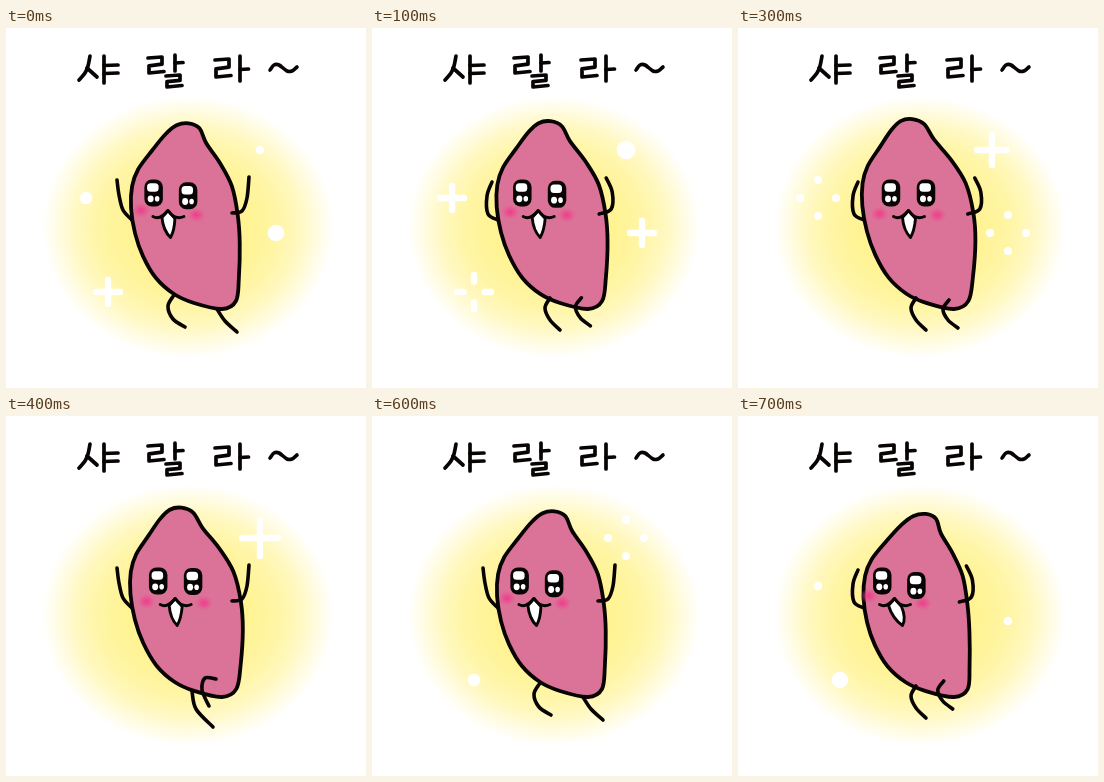
Animation, 360 px wide and 360 px high, one loop 0.8 s. Source, as an HTML page with a canvas:

```html
<!DOCTYPE html>
<html lang="ko">
<head>
<meta charset="utf-8">
<title>샤랄라~</title>
<style>
html, body { margin: 0; width: 100%; height: 100%; overflow: hidden; background: #fff; }
canvas { display: block; width: 100vw; height: 100vh; }
</style>
</head>
<body>
<canvas id="stage" width="360" height="360" role="img" aria-label="샤랄라~"></canvas>
<script>
const STEP = 100, STEPS = 8;
const INK = '#080404', SKIN = '#db7297';
const ctx = document.getElementById('stage').getContext('2d');

const pts = s => s.split(' ').map(p => p.split(',').map(Number));
const shift = (p, dx, dy = 0) => p.map(([x, y]) => [x + dx, y + dy]);

// Upright body; bend() sways it
const body = pts('182,95 193,100 200,115 214,135 226,158 232,187 234,215 233,250 230,273 216,281 ' +
  '188,275 168,266 150,250 137,228 129,205 125,180 126,158 132,141 146,122 159,106 170,97');
const arms = {
  open: ['111,152 113,167 117,182 126,192', '243,149 241,170 236,183 226,185'].map(pts),
  folded: ['120,154 115,168 116,186 126,192', '232,150 238,164 237,181 225,186'].map(pts)
};
const legs = {
  stride: ['168,267 162,278 167,291 179,299', '211,281 219,293 231,304'].map(pts),
  cross: ['186,275 190,293 207,311', '210,263 199,262 196,274 203,290'].map(pts),
  tucked: ['178,270 173,280 178,292 188,302', '208,268 202,277 207,288 217,296'].map(pts)
};

// The sway swings from a backward lean (-0.75) to a full stretch (1) and back.
const swing = step => {
  const k = (step + 1) % STEPS;
  return { far: Math.abs(4 - k), sway: 1 - 1.75 * Math.pow(Math.abs(4 - k) / 4, 1.7) };
};

function bend([x, y], s) {
  const h = Math.max(0, (280 - y) / 186);
  const bulge = 4 * Math.sin(Math.PI * h) * (x - 125) / 110;
  return [x + s * (bulge - 8 * h ** 4), y - 4 * s * h];
}

// Dot grows until bloom, is a cross until split, then bursts and scatters.
const sparkles = [
  { x: 254, y: 122, born: 0, bloom: 2, split: 5, grow: 5 },
  { x: 80, y: 170, born: 7, bloom: 2, split: 3, grow: 2 },
  { x: 270, y: 205, born: 7, bloom: 2, split: 3, grow: 4 },
  { x: 102, y: 264, born: 5, bloom: 3, split: 4, grow: 2 }
];

function curve(p, closed) {
  const n = p.length;
  const at = i => closed ? p[(i + n) % n] : p[Math.max(0, Math.min(n - 1, i))];
  ctx.beginPath();
  ctx.moveTo(...p[0]);
  for (let i = 0; i < (closed ? n : n - 1); i++) {
    const [a, b, c, d] = [at(i - 1), at(i), at(i + 1), at(i + 2)];
    ctx.bezierCurveTo(b[0] + (c[0] - a[0]) / 6, b[1] + (c[1] - a[1]) / 6,
      c[0] - (d[0] - b[0]) / 6, c[1] - (d[1] - b[1]) / 6, c[0], c[1]);
  }
  if (closed) ctx.closePath();
}

function pen(color, width) {
  ctx.strokeStyle = color;
  ctx.lineWidth = width;
  ctx.stroke();
}

function line(p, color, width) {
  ctx.beginPath();
  p.forEach(q => ctx.lineTo(...q));
  pen(color, width);
}

function fill(color) {
  ctx.fillStyle = color;
  ctx.fill();
}

function oval(x, y, rx, ry, color) {
  ctx.beginPath();
  ctx.ellipse(x, y, rx, ry, 0, 0, Math.PI * 2);
  fill(color);
}

function block(x, y, w, h, r, color) {
  ctx.beginPath();
  ctx.roundRect(x - w / 2, y - h / 2, w, h, r);
  fill(color);
}

function glow(x, y, rx, ry, stops) {
  ctx.save();
  ctx.translate(x, y);
  ctx.scale(rx, ry);
  const g = ctx.createRadialGradient(0, 0, 0, 0, 0, 1);
  stops.forEach(([at, color]) => g.addColorStop(at, color));
  oval(0, 0, 1, 1, g);
  ctx.restore();
}

function drawSparkle({ x, y, born, bloom, split, grow }, step) {
  const age = (step - born + STEPS) % STEPS;
  if (age < bloom) return oval(x, y, 4.3 + grow * age, 4.3 + grow * age, '#fff');
  if (age > split + 1) return;
  ctx.save();
  ctx.translate(x, y);
  for (let i = 0; i < 4; i++) {
    if (age > split) oval(18, 0, 4, 4, '#fff');
    else if (age === split) line([[10.5, 0], [17, 0]], '#fff', 6.4);
    else line([[0, 0], [12 + 3 * (age - bloom), 0]], '#fff', 6.4);
    ctx.rotate(Math.PI / 2);
  }
  ctx.restore();
}

function drawEye(x, y) {
  block(x, y, 18.5, 27, 7.5, INK);
  block(x - 0.8, y - 5.5, 11.5, 8.5, 3.5, '#fff');
  oval(x - 3, y + 5.8, 3, 3.4, '#fff');
  oval(x + 3.5, y + 5.8, 2.3, 2.8, '#fff');
}

function drawMouth(x, y, slant) {
  ctx.save();
  ctx.translate(x, y);
  ctx.beginPath();
  ctx.moveTo(-6, 7);
  ctx.lineTo(0, 0);
  ctx.lineTo(7, 8);
  ctx.quadraticCurveTo(6 + slant, 20, 2 + slant, 27);
  ctx.quadraticCurveTo(-5 + slant / 2, 20, -6, 7);
  fill('#fff');
  pen(INK, 2.9);
  ctx.beginPath();
  ctx.moveTo(-15, 6);
  ctx.quadraticCurveTo(-8, 10, 0, 0);
  ctx.quadraticCurveTo(7, 10, 16, 6);
  pen(INK, 2.9);
  ctx.restore();
}

function drawCheek(x, y) {
  glow(x, y, 9, 7.5, [[0, 'rgba(243,52,138,.85)'], [0.4, 'rgba(241,60,140,.6)'],
    [1, 'rgba(235,80,145,0)']]);
}

function drawFigure(step) {
  const { far, sway: s } = swing(step);
  const folded = far % 2 === 0;
  const [armL, armR] = folded ? arms.folded : arms.open;
  const [legL, legR] = folded ? legs.tucked : far === 1 ? legs.cross : legs.stride;
  const [dx, dy] = folded ? [3 * s, 4 * s] : [0, 0];

  curve(body.map(p => bend(p, s)), true);
  fill(SKIN);
  pen(INK, 3.8);
  drawCheek(135.5 + 6 * s, 182.5 + 3.5 * s);
  drawCheek(191 + 8.5 * s, 187);
  [armL, shift(armR, 1.6 * dx), legL, shift(legR, dx, dy)].forEach(limb => {
    curve(limb);
    pen(INK, 3.6);
  });
  drawEye(148 + 5 * s, 165);
  drawEye(182.5 + 5.5 * s, 167.5 - 2.5 * s);
  drawMouth(162.5 + 8 * s, 182.5, -8 * Math.min(0, s));
}

// Hand-lettered parts: ㄹ, and a stem with side ticks for ㅏ and ㅑ
function rieul(x, y, w, h) {
  line([[x, y + 1], [x + w - 1, y], [x + w - 1, y + h * 0.45], [x + 1, y + h * 0.55],
    [x + 1, y + h], [x + w + 1, y + h - 1.5]], INK, 3.7);
}

function stem(x, y, h, w, ...ticks) {
  line([[x, y], [x, y + h]], INK, 3.7);
  ticks.forEach(t => line([[x, y + t], [x + w, y + t - 0.5]], INK, 3.7));
}

function drawLetters(step) {
  ctx.save();
  ctx.translate(step % 3 === 2 ? 1 : 0, 0);
  curve(pts('84,28 82,38 79,45 73,52'));
  pen(INK, 3.7);
  line(pts('81,40 91,49'), INK, 3.7);
  stem(98, 28, 27, 14, 9.5, 17.5);
  rieul(142, 29, 15, 16);
  stem(169, 27, 16, 8, 8);
  rieul(160, 47, 15, 12);
  rieul(209, 31, 15, 18);
  stem(234, 28, 25, 8.5, 13.5);
  curve(pts('264,42 268,37 273,37 281,43 286,43 291,39'));
  pen(INK, 3.6);
  ctx.restore();
}

function draw(step) {
  ctx.fillStyle = '#fff';
  ctx.fillRect(0, 0, 360, 360);
  glow(182, 199, 146, 131, [[0, '#fff38c'], [0.42, '#fff394'], [0.6, '#fff5a4'],
    [0.76, '#fff8bf'], [0.89, '#fffce2'], [1, '#ffffff']]);
  sparkles.forEach(s => drawSparkle(s, step));
  drawFigure(step);
  drawLetters(step);
}

ctx.lineCap = ctx.lineJoin = 'round';
let shown = -1;
function tick() {
  const step = Math.floor(performance.now() / STEP) % STEPS;
  if (step !== shown) draw(shown = step);
  requestAnimationFrame(tick);
}
tick();
</script>
</body>
</html>
```
